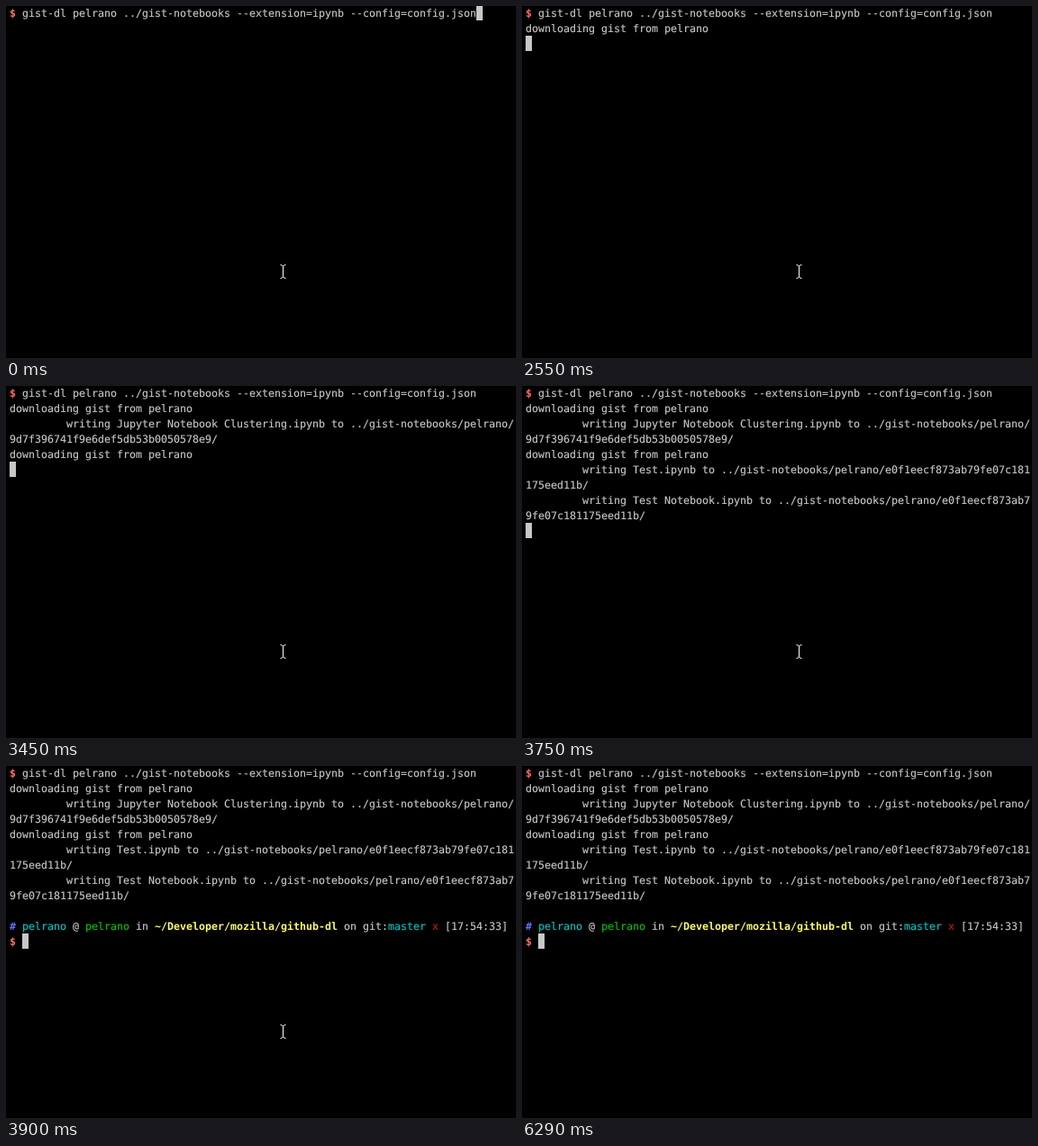
An HTML page that plays this animation: 566 by 391 pixels, repeating every 6.73 s.

```html
<!DOCTYPE html>
<html lang="en">
<head>
<meta charset="utf-8">
<title>Terminal session</title>
<style>
  html, body { margin: 0; width: 100%; height: 100%; overflow: hidden; background: #000; }
  svg { display: block; width: 566px; height: 391px; }
  text {
    font: 11.63px "DejaVu Sans Mono", monospace;
    text-rendering: geometricPrecision;
    white-space: pre;
    color: #c7c7c7;
  }
  text, tspan { fill: currentColor; stroke: currentColor; stroke-width: .15px; }
  .bold { font-weight: bold; stroke: none; }
  .prompt { color: #ff6d67; }
  .hash { color: #6871ff; }
  .cyan { color: #00c5c7; }
  .green { color: #00c200; }
  .path { color: #fefb67; }
  .dirty { color: #c91b00; }

  #cover, #caret, #pointer { animation: 6.73s step-end infinite; }
  #cover { animation-name: reveal; }
  #caret { fill: #c7c7c7; animation-name: caret; }
  #pointer { fill: none; stroke: #fff; animation-name: pointer; }

  /* Rows are 17px high, columns 7px wide. */
  @keyframes reveal {
    0% { transform: translateY(16px); }
    37.88% { transform: translateY(33px); }
    51.26% { transform: translateY(84px); }
    53.49% { transform: translateY(118px); }
    55.72% { transform: translateY(152px); }
    57.94%, 100% { transform: translateY(203px); }
  }
  @keyframes caret {
    0% { transform: translate(522px, -1px); }
    17.83% { transform: translate(4px, 16px); }
    37.88% { transform: translate(4px, 33px); }
    51.26% { transform: translate(4px, 84px); }
    53.49% { transform: translate(4px, 118px); }
    55.72% { transform: translate(4px, 152px); }
    57.94%, 100% { transform: translate(18px, 186px); }
  }
  @keyframes pointer {
    0% { transform: translate(304px, 287px); visibility: visible; }
    89% { transform: translate(316px, 277px); visibility: visible; }
    91.23% { transform: translate(335px, 257px); visibility: visible; }
    93.46%, 100% { transform: translate(335px, 257px); visibility: hidden; }
  }
</style>
</head>
<body>
<svg viewBox="0 0 566 391">
  <rect width="566" height="391"/>
  <text x="4" y="12"><tspan class="bold prompt">$</tspan> gist-dl pelrano ../gist-notebooks --extension=ipynb --config=config.json</text>
  <text x="4" y="29">downloading gist from pelrano</text>
  <text x="4" y="46">         writing Jupyter Notebook Clustering.ipynb to ../gist-notebooks/pelrano/</text>
  <text x="4" y="63">9d7f396741f9e6def5db53b0050578e9/</text>
  <text x="4" y="80">downloading gist from pelrano</text>
  <text x="4" y="97">         writing Test.ipynb to ../gist-notebooks/pelrano/e0f1eecf873ab79fe07c181</text>
  <text x="4" y="114">175eed11b/</text>
  <text x="4" y="131">         writing Test Notebook.ipynb to ../gist-notebooks/pelrano/e0f1eecf873ab7</text>
  <text x="4" y="148">9fe07c181175eed11b/</text>
  <text x="4" y="182"><tspan class="bold hash">#</tspan> <tspan class="cyan">pelrano</tspan> @ <tspan class="green">pelrano</tspan> in <tspan class="bold path">~/Developer/mozilla/github-dl</tspan> on git:<tspan class="cyan">master</tspan> <tspan class="dirty">x</tspan> [17:54:33]</text>
  <text x="4" y="199"><tspan class="bold prompt">$</tspan></text>
  <rect id="cover" width="566" height="391"/>
  <rect id="caret" width="7" height="17"/>
  <path id="pointer" d="M.5 .5Q3 .5 3.5 2.5Q4 .5 6.5 .5M3.5 2V14M.5 15.5Q3 15.5 3.5 13.5Q4 15.5 6.5 15.5"/>
</svg>
</body>
</html>
```
